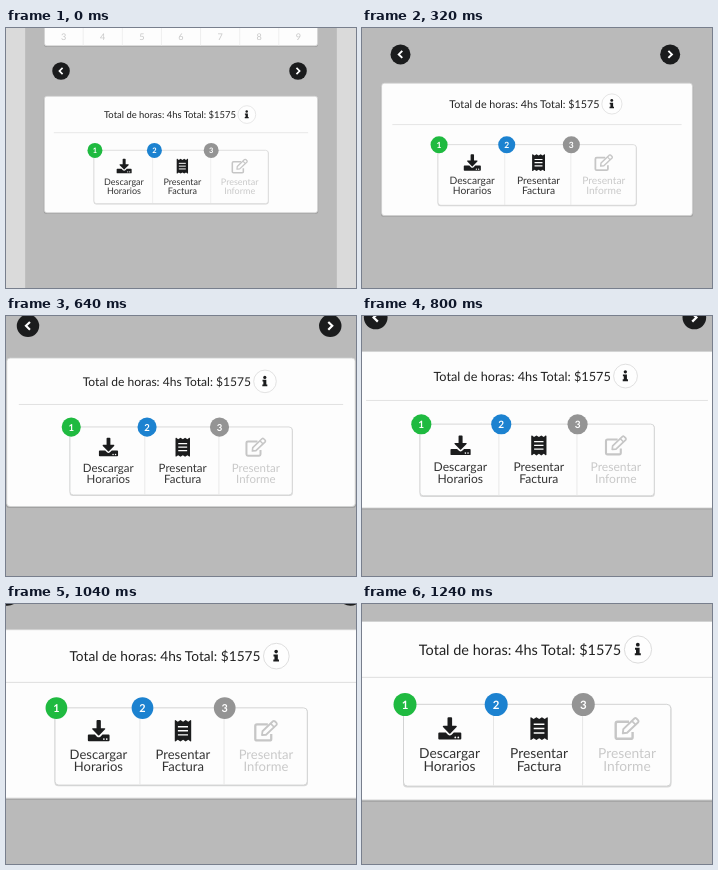
Recreate the animation shown at these times as an HTML page. Size 350x260 px, loop 2120 ms.

```html
<!DOCTYPE html>
<html lang="es">
<head>
<meta charset="utf-8">
<title>Total de horas</title>
<style>
  html, body { margin: 0; width: 100%; height: 100%; overflow: hidden; background: #dadada; }
  svg { display: block; width: 350px; height: 260px; }
  text { font-family: Lato, sans-serif; text-rendering: geometricPrecision; text-anchor: middle; }
  .panel { fill: #fdfdfd; stroke: #d2d3d3; stroke-width: 1; }
  .shade { fill: #000; opacity: .14; }
  .rule { stroke: #dedede; stroke-width: 1; }
  .ink { fill: #1b1c1d; }
  .label { font-size: 13.8px; fill: #333; }
  .off .label { fill: #c9c9c9; }
  .day { font-size: 14px; fill: #c8c8c8; }
  .badge { font-size: 11.5px; font-weight: 700; fill: #fff; }
</style>
</head>
<body>
<svg viewBox="0 0 350 260">
  <rect width="350" height="260" fill="#dadada"/>
  <g id="page">
    <rect x="-64" y="-300" width="478" height="800" fill="#bababa"/>

    <rect class="shade" x="-35" y="-158" width="420" height="100" rx="4"/>
    <rect class="panel" x="-34.5" y="-160" width="419" height="100" rx="4"/>
    <g id="days"></g>

    <g id="arrows"></g>

    <rect class="shade" x="-35.5" y="19" width="421" height="178.7" rx="4"/>
    <rect class="panel" x="-34.5" y="17.5" width="419" height="178.5" rx="4"/>
    <text x="158" y="51" font-size="14.5" fill="#212121">Total de horas: 4hs Total: $1575</text>
    <circle cx="276" cy="45.5" r="13.6" fill="#fefefe" stroke="#dcdcdc"/>
    <g class="ink">
      <circle cx="275.8" cy="40.7" r="1.9"/>
      <path d="M273 43.7h4.6v5.5h1.2v2.1h-6v-2.1h1.2v-3.4h-1z"/>
    </g>
    <path class="rule" d="M-20 73.3H370"/>

    <rect class="shade" x="41" y="101" width="268.5" height="82.4" rx="4"/>
    <rect class="panel" x="41.5" y="100.3" width="267.3" height="81.8" rx="4"/>
    <path class="rule" d="M131.5 101V181.6M220.6 101V181.6" style="stroke:#e6e6e6"/>
    <g id="steps"></g>
  </g>
</svg>
<script>
const LOOP = 2120, TICK = 40, TICKS = 31;
const PIVOT = { x: 175, y: 163.5 };
const START = 0.652;
const $ = id => document.getElementById(id);

const icons = {
  download: `<g class="ink" transform="translate(76.3 113.2)">
    <path d="M10.2 0h2.6q1 0 1 1v7.6h4q1.3.2.5 1.3l-6.2 6.3q-.6.6-1.2 0L4.7 9.9q-.8-1.1.5-1.3h4V1q0-1 1-1z"/>
    <path d="M1 15.4h6.5l2.2 2.2q1.8 1.5 3.6 0l2.2-2.2H22q1 0 1 1v5q0 1-1 1H1q-1 0-1-1v-5q0-1 1-1z"/>
    <g fill="#fdfdfd"><circle cx="17" cy="20.2" r=".9"/><circle cx="20" cy="20.2" r=".9"/></g></g>`,
  receipt: `<g class="ink" transform="translate(168.4 113.2)">
    <path d="M0 .6Q.2-.2 1 .2l2.2 1.6L6 0l2.8 1.8L11.5 0l2.8 1.8L16.4.2q.8-.4 1 .4v21.6q-.2.8-1 .4l-2.1-1.6-2.8 1.8L8.8 21 6 22.8 3.2 21 1 22.6q-.8.4-1-.4z"/>
    <path d="M3.3 7.1H14M3.3 11.4H14M3.3 15.7H14" stroke="#fdfdfd" stroke-width="1.5"/></g>`,
  edit: `<g transform="translate(252.5 113.2)" fill="none" stroke="#c6c6c6" stroke-width="2.4" stroke-linejoin="round">
    <path d="M14.5 4.6H3Q1.2 4.6 1.2 6.4V20Q1.2 21.6 3 21.6H16.4Q18.1 21.6 18.1 20V14.8"/>
    <path d="M8.3 16.1l.5-4.2L19.9 1.3q1-.8 2 0l1.8 1.8q.8 1 0 2L12.6 15.6z" stroke-width="1.9"/>
    <path d="M17.3 3.6l4 4" stroke-width="1.7"/></g>`
};

const step = (n, cx, bx, color, icon, top, bottom, off) => `<g class="${off ? 'off' : ''}">
  ${icons[icon]}
  <text class="label" x="${cx}" y="154">${top}</text>
  <text class="label" x="${cx}" y="167.3">${bottom}</text>
  <circle cx="${bx}" cy="100.5" r="11.5" fill="${color}"/>
  <text class="badge" x="${bx}" y="104.6">${n}</text></g>`;

const arrow = (x, dir) => `<g transform="translate(${x} -21.3)">
  <circle class="ink" r="13.5"/>
  <path d="M${-2.4 * dir} -4.7L${2.4 * dir} 0L${-2.4 * dir} 4.7" fill="none" stroke="#fff" stroke-width="2.6"/></g>`;

const day = i => `<text class="day" x="${-5 + 60 * i}" y="-69">${i + 3}</text>` +
  (i ? `<path class="rule" d="M${-35 + 60 * i} -160V-60" style="stroke:#e8e8e8"/>` : '');

$('days').innerHTML = [...Array(7).keys()].map(day).join('');
$('arrows').innerHTML = arrow(-9, -1) + arrow(354.5, 1);
$('steps').innerHTML =
  step(1, 87.5, 43, '#1fba40', 'download', 'Descargar', 'Horarios') +
  step(2, 177, 134.2, '#1c82d0', 'receipt', 'Presentar', 'Factura') +
  step(3, 265, 221.3, '#949494', 'edit', 'Presentar', 'Informe', true);

// Linear zoom around the pivot, advancing in 40 ms ticks, then a hold.
function draw(ms) {
  const p = Math.min(Math.floor(ms / TICK), TICKS) / TICKS;
  const s = START + (1 - START) * p;
  $('page').setAttribute('transform',
    `translate(${PIVOT.x * (1 - s)} ${PIVOT.y * (1 - s)}) scale(${s})`);
}

const began = performance.now();
function loop() {
  draw((performance.now() - began) % LOOP);
  requestAnimationFrame(loop);
}
draw(0);
requestAnimationFrame(loop);
</script>
</body>
</html>
```
